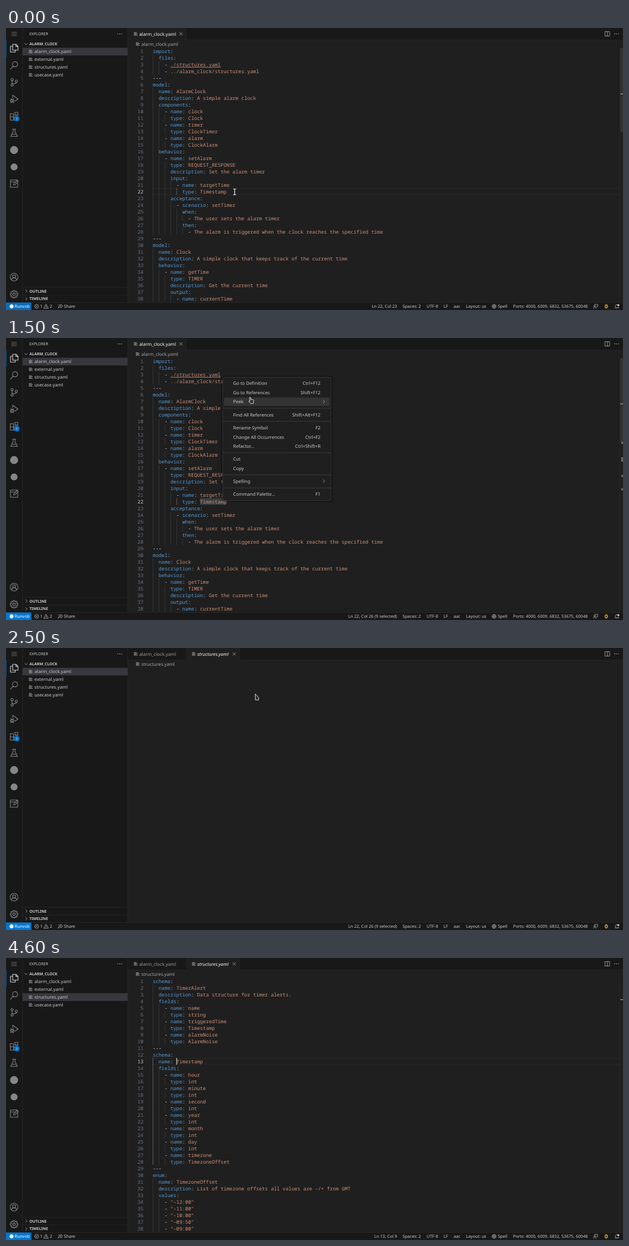
Recreate the animation shown at these times as an HTML page. Size 1107 by 506 pixels, loop 4700 ms.

```html
<!DOCTYPE html>
<html lang="en">
<head>
<meta charset="utf-8">
<title>Go to definition</title>
<style>
html, body { margin: 0; width: 100%; height: 100%; overflow: hidden; background: #1f1f1f; }
svg { display: block; width: 100%; height: 100%; text-rendering: geometricPrecision; }
text { white-space: pre; font-family: "Noto Sans", sans-serif; font-size: 8.2px; fill: #ccc; }
.mono { font-family: "Noto Sans Mono", monospace; font-size: 8.84px; }
.key { fill: #569cd6; }
.str { fill: #ce9178; }
.num { fill: #6e7681; }
.small { font-size: 7.58px; }
.head { font-size: 6.95px; }
.bold { font-weight: 700; }
.dim { fill: #9d9d9d; }
.icon { fill: none; stroke: #868686; stroke-width: 1.1; stroke-linejoin: round; stroke-linecap: round; }
.lite { stroke: #ccc; stroke-width: .7; }
</style>
</head>
<body>
<svg id="stage" viewBox="0 0 1107 506" preserveAspectRatio="none"></svg>
<script>
const NS = "http://www.w3.org/2000/svg";
const stage = document.getElementById("stage");
const LOOP = 4700, STEP = 100;
const COL = 5.304, ROW = 12, LEFT = 263.2, TOP = 35.4;
const ITEM = 13.9, LIST = 35.4;

function add(parent, tag, attrs, content) {
  const node = document.createElementNS(NS, tag);
  for (const k in attrs) node.setAttribute(k, attrs[k]);
  if (content !== undefined) node.textContent = content;
  parent.appendChild(node);
  return node;
}
const group = (parent = stage) => add(parent, "g", {});
const rect = (p, x, y, width, height, fill, more) => add(p, "rect", { x, y, width, height, fill, ...more });
const label = (p, x, y, s, cls = "", more) => add(p, "text", { x, y: y + 2.9, class: cls, ...more }, s);
const icon = (p, x, y, d, cls = "", more) =>
  add(p, "path", { d, class: "icon " + cls, transform: `translate(${x} ${y})`, ...more });
const show = (node, on) => node.setAttribute("display", on ? "inline" : "none");
const circle = (r, x = 0, y = 0) => `M${x - r} ${y}a${r} ${r} 0 1 0 ${2 * r} 0a${r} ${r} 0 1 0 ${-2 * r} 0z`;

const LINES = "M-3-2.4h4M-3-.8h6M-3 .8h4M-3 2.4h6";
const CROSS = "M-2.4-2.4L2.4 2.4M2.4-2.4L-2.4 2.4";
const DOTS = [-3.3, 0, 3.3].map(x => circle(.35, x)).join("");
const GEAR = circle(2.2) + Array.from({ length: 8 }, (_, i) => {
  const p = (r, a) => (r * Math.cos(a)).toFixed(2) + " " + (r * Math.sin(a)).toFixed(2);
  const a = i * Math.PI / 4;
  return (i ? "L" : "M") + [p(5, a - .28), p(6.9, a - .2), p(6.9, a + .2), p(5, a + .28)].join("L");
}).join("") + "z";

// ---------- documents ----------
const alarmDoc = `import:
  files:
    - ./structures.yaml
    - ../alarm_clock/structures.yaml
---
model:
  name: AlarmClock
  description: A simple alarm clock
  components:
    - name: clock
      type: Clock
    - name: timer
      type: ClockTimer
    - name: alarm
      type: ClockAlarm
  behavior:
    - name: setAlarm
      type: REQUEST_RESPONSE
      description: Set the alarm timer
      input:
        - name: targetTime
          type: Timestamp
      acceptance:
        - scenario: setTimer
          when:
            - The user sets the alarm timer
          then:
            - The alarm is triggered when the clock reaches the specified time
---
model:
  name: Clock
  description: A simple clock that keeps track of the current time
  behavior:
    - name: getTime
      type: TIMER
      description: Get the current time
      output:
        - name: currentTime`;

const field = (name, type) => `    - name: ${name}\n      type: ${type}\n`;
const structDoc = `schema:
  name: TimerAlert
  description: Data structure for timer alerts.
  fields:
${field("name", "string")}${field("triggeredTime", "Timestamp")}${field("alarmNoise", "AlarmNoise")}---
schema:
  name: Timestamp
  fields:
${["hour", "minute", "second", "year", "month", "day"].map(n => field(n, "int")).join("")}${field("timezone", "TimezoneOffset")}---
enum:
  name: TimezoneOffset
  description: List of timezone offsets all values are -/+ from GMT
  values:
${["12:00", "11:00", "10:00", "09:50", "09:00"].map(v => `    - "-${v}"`).join("\n")}`;

const lineTop = n => TOP + (n - 1) * ROW;
const colX = c => LEFT + c * COL;

function drawDoc(doc, current, guideCol, guideEnd) {
  const g = group();
  const lineBox = group(g), under = group(g), body = group(g);
  for (const y of [0, ROW - 1]) rect(lineBox, 262, lineTop(current) + y, 840, 1.2, "#282828");
  doc.split("\n").forEach((line, i) => {
    const n = i + 1, y = lineTop(n), base = y + 9.5;
    add(body, "text", { x: 246.6, y: base, class: "mono " + (n === current ? "" : "num"), "text-anchor": "end" }, n);
    const [, pad, dash, key, value] = line.match(/^( *)(- )?(\w+:(?= |$))?(.*)$/);
    for (let c = 0; c < pad.length; c += 2) {
      const active = c === guideCol && n >= current && n <= guideEnd;
      rect(body, colX(c) + .2, y, .7, ROW, active ? "#808080" : "#404040");
    }
    let col = pad.length;
    const put = (s, cls) => {
      if (s) add(body, "text", { x: colX(col), y: base, class: "mono " + cls }, s);
      col += s.length;
    };
    put(dash || "", "");
    if (key) { put(key.slice(0, -1), "key"); put(":", ""); }
    const gap = value.match(/^ */)[0].length;
    col += gap;
    put(value.slice(gap), line === "---" ? "" : "str");
  });
  return { g, lineBox, under };
}

// ---------- editor ----------
rect(stage, 0, 0, 1107, 506, "#1f1f1f");
const alarm = drawDoc(alarmDoc, 22, 8, 22);
const struct = drawDoc(structDoc, 13, 0, 28);
rect(alarm.g, colX(6), 70, 17 * COL, .8, "#ce9178");
const selection = rect(alarm.under, colX(16), lineTop(22), 9 * COL, ROW, "#264f78");
const match = rect(alarm.under, colX(16), lineTop(39), 9 * COL, ROW, "#575757");
const caretA = rect(alarm.g, colX(25), lineTop(22), 1.3, ROW, "#ccc");
const caretS = rect(struct.g, colX(8), lineTop(13), 1.3, ROW, "#ccc");

function scrollbar(doc, height, mark) {
  rect(doc.g, 1101.3, 36, .7, 456, "#2b2b2b");
  const slider = rect(doc.g, 1102, 36, 5, height, "#797979", { opacity: .22 });
  rect(doc.g, 1102, mark, 5, 1.3, "#a0a0a0");
  return slider;
}
scrollbar(alarm, 150.5, 117.6);
const slider = scrollbar(struct, 125, 74);
const marks = group(alarm.g);
for (const [y, h] of [[186, 4], [214, 8], [245.5, 4], [269.5, 4]]) rect(marks, 1104, y, 2.6, h, "#777");

// ---------- tabs and breadcrumb ----------
rect(stage, 219, 0, 888, 22, "#181818");
rect(stage, 219, 21, 888, .6, "#2b2b2b");
function tab(x, w, name, active, italic) {
  const g = group();
  if (active) {
    rect(g, x, 0, w, 22, "#1f1f1f");
    icon(g, x + w - 9.4, 10.6, CROSS, "lite");
  }
  rect(g, x + w - .5, 0, .7, 21.5, "#2b2b2b");
  icon(g, x + 13.8, 10.6, LINES, "lite");
  const look = { ...(active && { style: "fill:#fff" }), ...(italic && { "font-style": "italic" }) };
  label(g, x + 20, 10.6, name, active ? "" : "dim", look);
  return g;
}
const tabOn = tab(219, 104.3, "alarm_clock.yaml", true);
const tabOff = tab(219, 104.3, "alarm_clock.yaml", false);
const tabNew = tab(323.3, 95.5, "structures.yaml", true, true);
icon(stage, 236.5, 28.7, LINES, "lite");
const crumb = label(stage, 242.8, 28.7, "", "", { style: "fill:#a9a9a9" });
icon(stage, 1079, 10.5, "M-4-4h8v8h-8zM0-4v8", "lite");
icon(stage, 1095.5, 10.5, DOTS, "lite");

// ---------- sidebar ----------
rect(stage, 0, 0, 218.6, 493, "#181818");
rect(stage, 29.3, 0, .7, 493, "#2b2b2b");
rect(stage, 218.2, 0, .7, 493, "#2b2b2b");
label(stage, 42, 10.5, "EXPLORER", "head");
icon(stage, 204, 10.6, DOTS, "lite");
icon(stage, 36, 28.6, "M-2.3-1L0 1.4L2.3-1", "lite");
label(stage, 42, 28.2, "ALARM_CLOCK", "head bold");
const hoverRow = rect(stage, 30, LIST, 188.2, ITEM, "#2a2d2e");
const pickRow = rect(stage, 30, LIST, 188.2, ITEM, "#37373d");
["alarm_clock.yaml", "external.yaml", "structures.yaml", "usecase.yaml"].forEach((name, i) => {
  icon(stage, 44.5, 42.3 + i * ITEM, LINES, "lite");
  label(stage, 51, 42.5 + i * ITEM, name);
});
["OUTLINE", "TIMELINE"].forEach((name, i) => {
  rect(stage, 30, 464.8 + i * ITEM, 188.2, .7, "#2b2b2b");
  icon(stage, 36.5, 472 + i * ITEM, "M-1-2.3L1.4 0L-1 2.3", "lite");
  label(stage, 42, 471.6 + i * ITEM, name, "head bold");
});
const actions = group();
[
  [164, "M3.2-.5V-2L1-4h-4v8h3M1-4v2h2.2M1.5 2.6h4M3.5 .6v4"],
  [179.5, "M4.5 0v-2.6h-4.5l-1-1.2h-3.5v7h4M-4.5-1.4h3M1.5 2.6h4M3.5 .6v4"],
  [194.5, "M-3-2A3.6 3.6 0 1 0 .5-3.6M-3.4-4v2.4h2.4"],
  [209.5, "M-3.8-1.4h5.4v5.2h-5.4zM-1.8-1.4v-2.4h5.6v5.4h-2.2M-2.4 1.2h2.6"]
].forEach(([x, d]) => icon(actions, x, 28.7, d, "lite"));

// ---------- activity bar ----------
rect(stage, 0, 21.5, .6, 30.3, "#0078d4");
icon(stage, 14.5, 10.8, "M-4.5-3h9M-4.5 0h9M-4.5 3h9", "", { style: "stroke-width:.8" });
[
  [36.3, "M-2.5-7h6l3.5 3.5V3.5h-9.5zM3.2-7v3.8h3.8M-2.5-3.5h-4V7h8.5V3.7"],
  [66.8, circle(4.6, 1.8, -1.8) + "M-1.5 1.5L-6.5 7"],
  [97.3, circle(2, -3.5, -4.8) + circle(2, -3.5, 5) + circle(2, 4, -1.8) + "M-3.5-2.8v5.8M4 .2q0 2.3-3 2.3h-2q-2.5 0-2.5 .8"],
  [127.5, "M-2.5-2.5V-7L7 0L1.5 3.8" + circle(2.6, -3.4, 3) + "M-3.4 .4v5.2M-6-.5l1 1M-.8-.5l-1 1M-7.2 3h1.2M-.8 3h1.2M-6 6.5l1-1M-.8 6.5l-1-1"],
  [158.2, "M-6.8-4.5h5.8v5.8h5.8v5.8h-11.6zM-6.8 1.3h5.8v5.8M1.5-7h5.2v5.2h-5.2z"],
  [188, "M-2.8-6.5h5.6M-1.7-6.5v4.5L-6 6.5h12L1.7-2v-4.5M-4.2 2.8h8.4"],
  [279.3, "M6.5-2V6.5h-13v-13h13M-6.5-3h8M-1 2.5l.6-2.5L5.5-6l2 2L1.5 2z"],
  [447, circle(7) + circle(2.7, 0, -1.6) + "M-4.6 5.2q.6-3.8 4.6-3.8t4.6 3.8"],
  [477.8, GEAR]
].forEach(([y, d], i) => icon(stage, 14.5, y, d, "", i ? {} : { style: "stroke:#d7d7d7" }));
add(stage, "circle", { cx: 14.5, cy: 219, r: 7.2, fill: "#868686" });
add(stage, "circle", { cx: 14.5, cy: 249.3, r: 6.2, fill: "#868686" });
const badge = add(stage, "circle", { cx: 19.3, cy: 162.6, r: 5 });
label(stage, 19.3, 161.8, "1", "", { "text-anchor": "middle", style: "font-size:5.7px;fill:#fff" });

// ---------- status bar ----------
rect(stage, 0, 492.4, 1107, 14, "#181818");
rect(stage, 0, 492.2, 1107, .7, "#2b2b2b");
const remote = rect(stage, 0, 492.6, 45.4, 13.4);
add(stage, "circle", { cx: 10, cy: 499.6, r: 3.5, fill: "#fff" });
const status = (x, s, more) => label(stage, x, 499.3, s, "small", more);
status(15.5, "Runvob", { style: "fill:#fff" });
icon(stage, 55, 499.5, circle(3.6) + "M-1.4-1.4L1.4 1.4M1.4-1.4L-1.4 1.4", "lite");
status(61.3, "1");
icon(stage, 72, 499.5, "M0-3.6L4 3.4h-8zM0-1.2v2.2M0 2.2v.2", "lite");
status(78.4, "2");
icon(stage, 98, 499.5, "M-4 3q.5-4.5 4.5-4.5V-3.5L4-.4L.5 2.6V.6Q-2.5 .6-4 3M-4-2.5h2.5", "lite");
status(103.8, "Share");
const place = status(701.6, "", { "text-anchor": "end" });
[[711.5, "Spaces: 2"], [754.8, "UTF-8"], [785, "LF"], [803, "aac"], [825.3, "Layout: us"], [882.4, "Spell"],
 [909.8, "Ports: 4000, 6009, 6832, 53675, 60048"]].forEach(([x, s]) => status(x, s));
icon(stage, 0, 0, GEAR, "lite", { transform: "translate(875.7 499.5) scale(.52)", style: "stroke-width:1.6" });
icon(stage, 1058, 499.5, circle(1.5, -1.6, -.6) + "M-4 3.6q.4-2.6 2.4-2.6t2.4 2.6M-2-3.6h5.6v4.2h-1.2l-1.2 1.2", "lite");
rect(stage, 1075.6, 495.4, 2.8, 8.2, "#8a6a1a");
add(stage, "circle", { cx: 1077, cy: 499.5, r: 2.4, fill: "#3a3a3a", stroke: "#f0a818", "stroke-width": 1.1 });
icon(stage, 1096, 499.5, "M1-3.4q-3.6-.4-3.6 3v1.6l-.8 1.4h6.8l-.8-1.4v-.8M-.9 2.8q.9 1.4 1.8 0", "lite");
add(stage, "circle", { cx: 1098.6, cy: 497.2, r: 1.8, fill: "#ccc" });

// ---------- context menu ----------
const items = [
  [81.5, "Go to Definition", "Ctrl+F12"], [97.9, "Go to References", "Shift+F12"], [114.3, "Peek", ">"],
  [137.7, "Find All References", "Shift+Alt+F12"],
  [161.2, "Rename Symbol", "F2"], [177.6, "Change All Occurrences", "Ctrl+F2"], [194, "Refactor...", "Ctrl+Shift+R"],
  [217.4, "Cut", ""], [233.8, "Copy", ""], [257, "Spelling", ">"], [280.5, "Command Palette...", "F1"]
];
const menu = group();
for (let i = 4; i; i--)
  rect(menu, 388.7 - i, 71 - i, 194.6 + 2 * i, 220.6 + 2 * i, "#000", { rx: 3 + i, opacity: .09 });
rect(menu, 388.9, 70.6, 194.2, 221, "#1f1f1f", { rx: 3, stroke: "#454545", "stroke-width": .7 });
const hoverItem = rect(menu, 391, 0, 189.6, 15.2, "#343434", { rx: 2.5 });
for (const y of [126, 149.5, 206, 245.5, 269]) rect(menu, 389.2, y - .3, 193.6, .7, "#454545");
for (const [y, name, keys] of items) {
  label(menu, 407.6, y, name);
  if (keys === ">") icon(menu, 570.3, y, "M-1.2-2.6L1.5 0L-1.2 2.6", "lite");
  else label(menu, 564.3, y, keys, "", { "text-anchor": "end" });
}

// ---------- pointer ----------
const pointer = add(stage, "path", { "stroke-linejoin": "round", "stroke-linecap": "round" });
const shapes = {
  beam: "M-2-5.2Q0-5.2 0-4Q0-5.2 2-5.2M0-4V4M-2 5.2Q0 5.2 0 4Q0 5.2 2 5.2",
  arrow: "M-2.4-5.8L3.6 1.2L2.8 5.2L-2.4 4.4z",
  hand: "M-3.2-5q0-1 .9-1t1 1l.4 3.2l4 .6q1.4 .3 1.3 1.8l-.3 2.6l-.6 2.4h-4.6l-3-3.4q-.6-1.2 .6-1.4l1 .5z"
};
const path = [
  [0, "beam", 410.3, 294], [200, "beam", 390, 293], [1000, "arrow", 392, 298.5],
  [1200, "hand", 396, 285], [1300, "hand", 413, 232], [1400, "hand", 431, 161], [1500, "hand", 440, 112],
  [1600, "hand", 443, 104], [1700, "hand", 445, 97.5], [1800, "hand", 447, 91], [1900, "hand", 449, 87.8],
  [2300, "arrow", 450, 88.5], [3000], [3200, "beam", 448, 83], [3500, "beam", 404, 70],
  [3700, "beam", 320, 58], [3800, "hand", 200, 44], [3900, "hand", 115.5, 33],
  [4000, "hand", 98, 23], [4100, "arrow", 88, 14], [4200]
];

function update(t) {
  const within = (a, b) => t >= a && t < b;
  const opened = t >= 2400, loaded = t >= 3000, selected = t >= 400;

  show(alarm.g, !opened);
  show(struct.g, loaded);
  show(alarm.lineBox, !selected);
  show(selection, selected);
  selection.setAttribute("fill", within(1000, 2300) ? "#3a3d41" : "#264f78");
  show(match, within(600, 1000));
  show(marks, t >= 600);
  show(caretA, within(400, 1000));
  show(caretS, within(3000, 3500) || within(3900, 4200) || t >= 4600);
  show(slider, t < 4600);

  show(tabOn, !opened);
  show(tabOff, opened);
  show(tabNew, opened);
  crumb.textContent = opened ? "structures.yaml" : "alarm_clock.yaml";
  pickRow.setAttribute("y", LIST + (loaded ? 2 * ITEM : 0));
  show(hoverRow, within(3800, 4100));
  show(actions, within(3800, 4200));
  place.textContent = loaded ? "Ln 13, Col 9" : selected ? "Ln 22, Col 26 (9 selected)" : "Ln 22, Col 23";
  for (const n of [badge, remote]) n.setAttribute("fill", selected ? "#0078d4" : "#0a6cbc");

  const [, kind, x, y] = path.filter(p => p[0] <= t).pop();
  show(pointer, !!kind);
  if (kind) {
    const beam = kind === "beam";
    pointer.setAttribute("d", shapes[kind]);
    pointer.setAttribute("transform", `translate(${x} ${y})`);
    pointer.setAttribute("fill", beam ? "none" : "#2b2f33");
    pointer.setAttribute("stroke", beam ? "#e8e8e8" : "#f4f4f4");
    pointer.setAttribute("stroke-width", beam ? 1.3 : .9);
  }
  show(menu, within(1000, 2300));
  const item = kind === "hand" && items.find(i => Math.abs(i[0] - (y - 5)) < 8.2);
  show(hoverItem, !!item);
  if (item) hoverItem.setAttribute("y", item[0] - 7.5);
}

const start = performance.now();
function frame(now) {
  const t = Math.max(0, now - start) % LOOP;
  update(Math.floor(t / STEP) * STEP);
  requestAnimationFrame(frame);
}
update(0);
requestAnimationFrame(frame);
</script>
</body>
</html>
```
